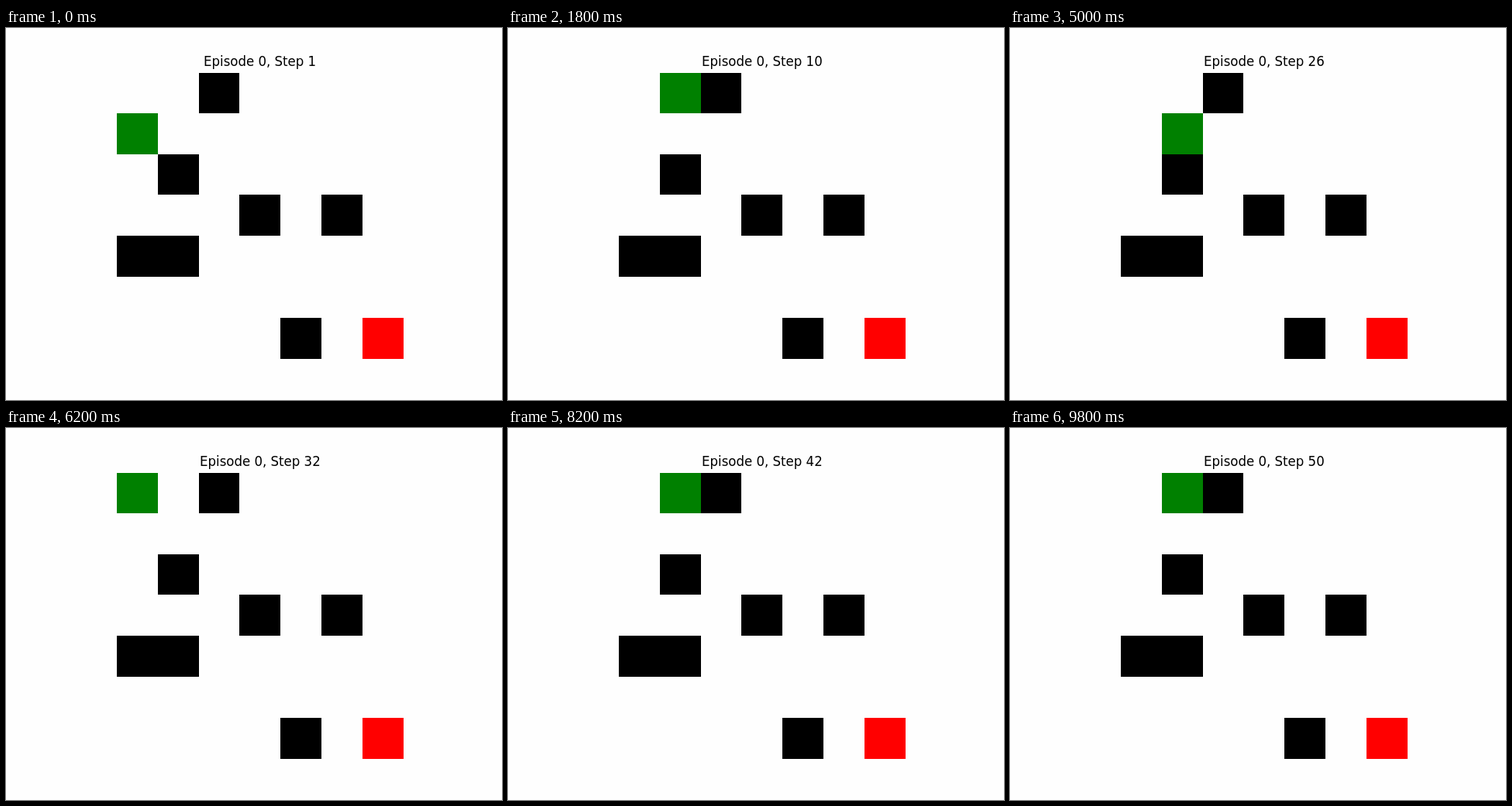
An HTML page with a canvas for the animation above (10000 ms loop, 640x480 px).

```html
<!DOCTYPE html>
<html lang="en">
<head>
<meta charset="utf-8">
<title>Grid walk</title>
<style>
html, body { margin: 0; width: 100%; height: 100%; overflow: hidden; background: #fefefe; }
canvas { display: block; }
</style>
</head>
<body>
<canvas id="stage" width="640" height="480"></canvas>
<script>
const ctx = document.getElementById('stage').getContext('2d');
const STEP_MS = 200;
const STEPS = 50;
const CELL = 52.8;
const TOP = 58;

// Grid lines snapped to whole pixels
const edgeX = col => Math.round(143.05 + CELL * col);
const edgeY = row => Math.max(TOP, Math.floor(57.5 + CELL * row));

const walls = [[2, 0], [1, 2], [3, 3], [5, 3], [0, 4], [1, 4], [4, 6]];
const goal = [6, 6];

// The agent walks around a 2 x 2 block; each move starts at the given step
const block = { A: [0, 0], B: [1, 0], C: [0, 1], D: [1, 1] };
const moves = [
  [1, 'C'], [3, 'A'], [9, 'B'], [13, 'D'], [18, 'B'], [23, 'D'], [28, 'C'], [30, 'A'],
  [34, 'C'], [36, 'A'], [40, 'B'], [45, 'D'], [46, 'C'], [48, 'A'], [50, 'B']
];

function agentCell(step) {
  const [, name] = moves.filter(([first]) => first <= step).pop();
  return block[name];
}

function fillCell([col, row], color) {
  const x = edgeX(col), y = edgeY(row);
  ctx.fillStyle = color;
  ctx.fillRect(x, y, edgeX(col + 1) - x, edgeY(row + 1) - y);
}

function drawTitle(text) {
  ctx.font = '16.6px "DejaVu Sans", sans-serif';
  ctx.fillStyle = '#000';
  const left = Math.round(328 - ctx.measureText(text).width / 2);
  ctx.save();
  ctx.translate(left, 49);
  ctx.scale(1, 1.07); // slightly tall letters
  ctx.fillText(text, 0, 0);
  ctx.restore();
}

function draw(step) {
  ctx.fillStyle = '#fefefe';
  ctx.fillRect(0, 0, 640, 480);
  walls.forEach(cell => fillCell(cell, '#000'));
  fillCell(goal, '#f00');
  fillCell(agentCell(step), '#008000');
  drawTitle(`Episode 0, Step ${step}`);
}

const start = performance.now();
function tick() {
  const elapsed = performance.now() - start;
  draw(Math.floor(elapsed / STEP_MS) % STEPS + 1);
  requestAnimationFrame(tick);
}
tick();
</script>
</body>
</html>
```
